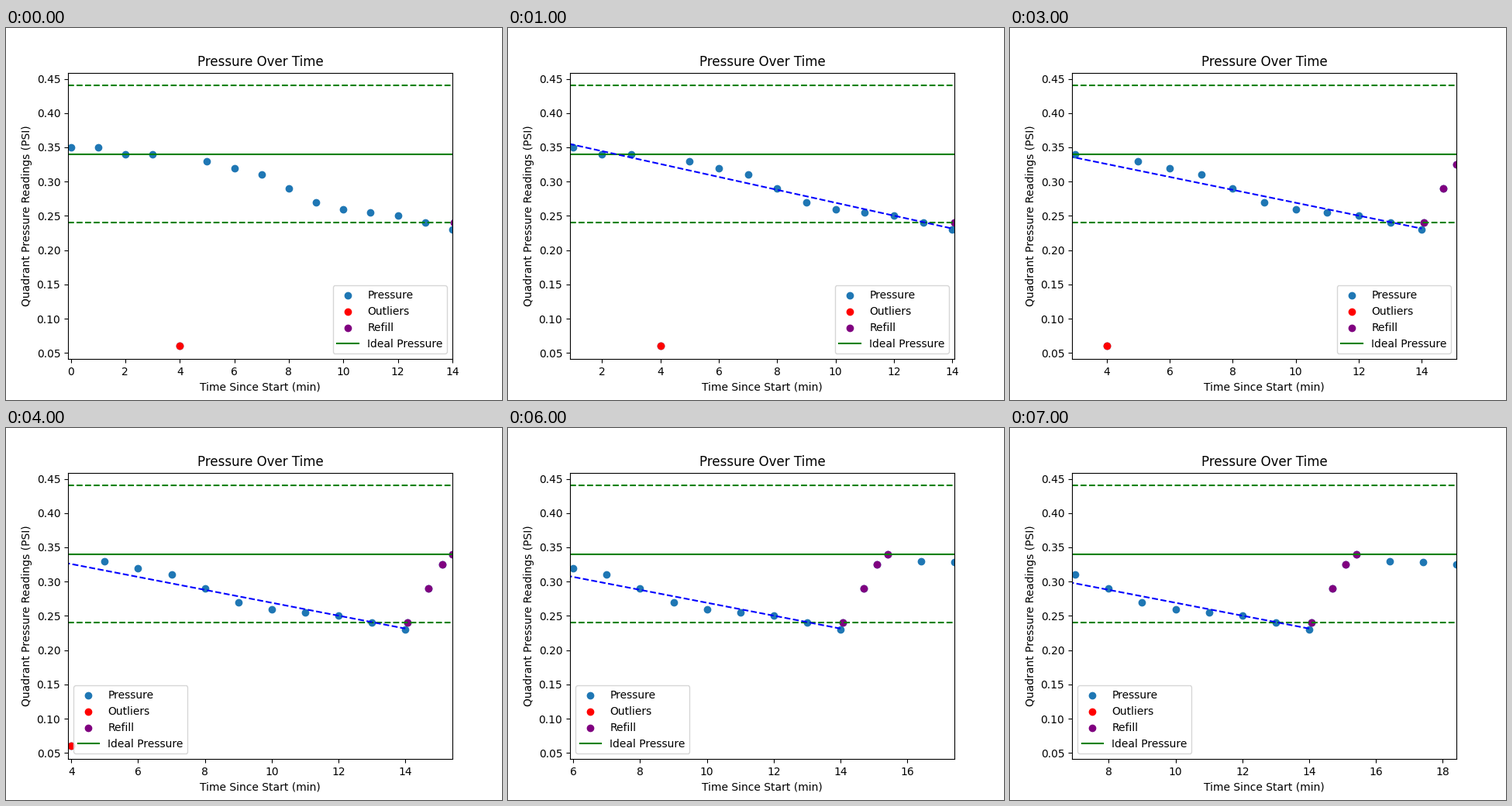
A matplotlib script for the animation above (8 s loop, 640 by 480 pixels).

```python
import numpy as np
import matplotlib.pyplot as plt
from matplotlib.animation import FuncAnimation

# Readings: minutes since start, pressure in PSI
steady_t = np.array([0, 1, 2, 3, 5, 6, 7, 8, 9, 10, 11, 12, 13, 14])
steady_p = np.array([0.35, 0.35, 0.34, 0.34, 0.33, 0.32, 0.31, 0.29,
                     0.27, 0.26, 0.255, 0.25, 0.24, 0.23])
outlier_t, outlier_p = np.array([4]), np.array([0.06])
refill_t = np.array([14.07, 14.69, 15.1, 15.41])
refill_p = np.array([0.24, 0.29, 0.325, 0.34])
after_t = refill_t[-1] + np.arange(1, 4)
after_p = np.array([0.33, 0.328, 0.325])

IDEAL, TOLERANCE = 0.34, 0.1
MARGIN = 0.1
FRAMES = 8
# The newest reading always sits on the right edge of the window
newest = np.concatenate([steady_t[-1:], refill_t, after_t])

fig, ax = plt.subplots(figsize=(6.4, 4.8), dpi=100)
ax.scatter(np.concatenate([steady_t, outlier_t, refill_t, after_t]),
           np.concatenate([steady_p, outlier_p, refill_p, after_p]),
           label="Pressure")
ax.scatter(outlier_t, outlier_p, color="red", label="Outliers")
ax.scatter(refill_t, refill_p, color="purple", label="Refill")

ax.axhline(IDEAL, color="green", label="Ideal Pressure")
for level in (IDEAL - TOLERANCE, IDEAL + TOLERANCE):
    ax.axhline(level, color="green", linestyle="--")

slope, base = np.polyfit(steady_t, steady_p, 1)
trend, = ax.plot(steady_t, slope * steady_t + base, "--", color="blue")

ax.set_ylim(0.041, 0.459)
ax.set_title("Pressure Over Time")
ax.set_xlabel("Time Since Start (min)")
ax.set_ylabel("Quadrant Pressure Readings (PSI)")
legend = ax.legend(loc="lower right")


def update(step):
    ax.set_xlim(step - MARGIN, newest[step])
    trend.set_visible(step > 0)
    # The legend moves left once the outlier no longer lies beneath it
    legend.set_loc("lower right" if step < outlier_t[0] else "lower left")
    return ()


anim = FuncAnimation(fig, update, frames=FRAMES, init_func=lambda: update(0),
                     interval=1000, repeat=True, repeat_delay=0, blit=False)
plt.show()
```
